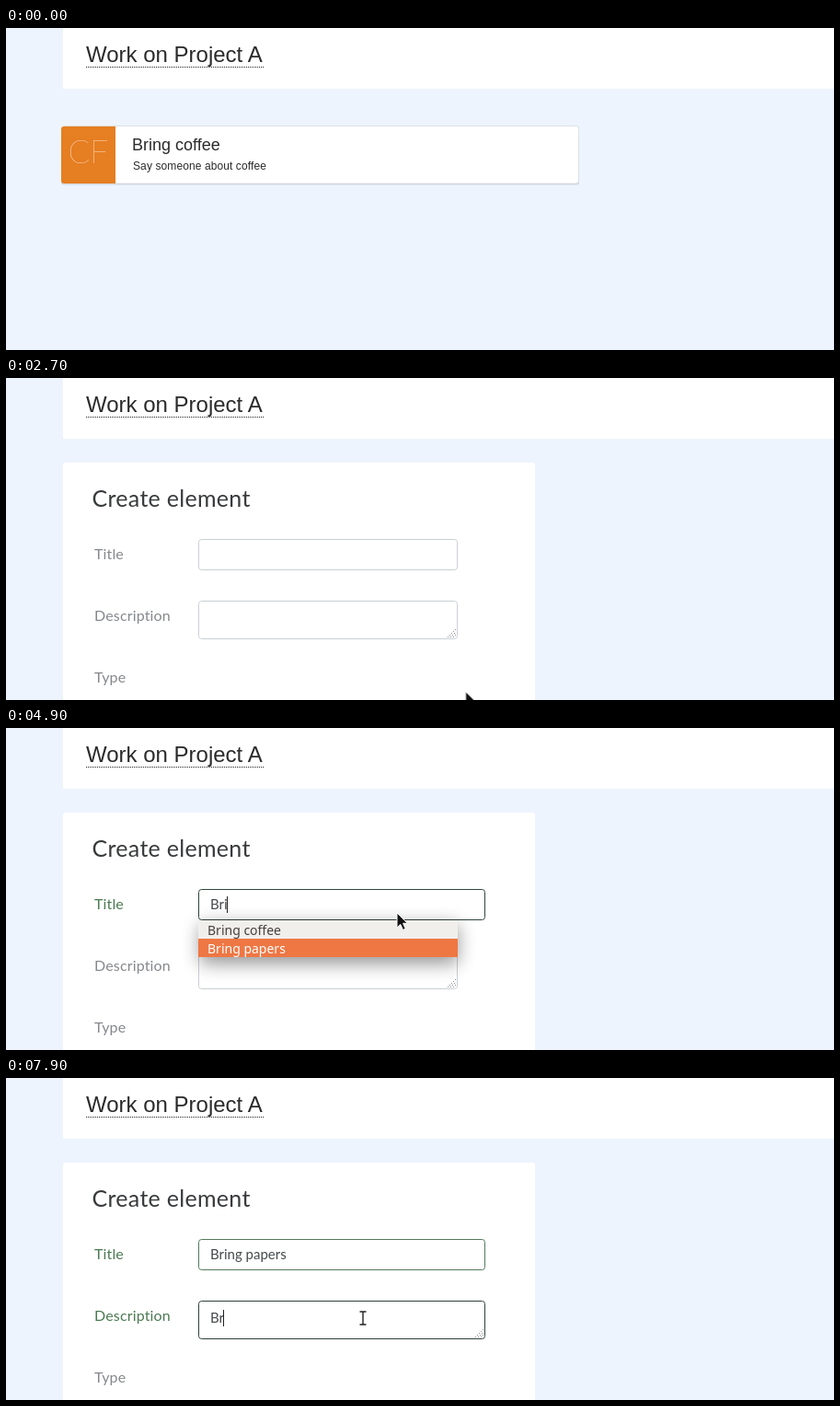
An HTML page for the animation above (8000 ms loop, 900x350 px).

```html
<!DOCTYPE html>
<html lang="en">
<head>
<meta charset="utf-8">
<title>Create element</title>
<style>
  html, body { margin: 0; width: 100%; height: 100%; overflow: hidden; background: #eef4fd; }
  svg { display: block; width: 900px; height: 350px; }

  .sans { font-family: "Liberation Sans", Arial, sans-serif; fill: #2b2b2b; }
  .lato { font-family: Lato, sans-serif; }
  .label { font-size: 16px; letter-spacing: .15px; fill: #85888c; }
  .value { font-size: 15px; fill: #454a4d; }
  .option { font: 14px "Noto Sans", sans-serif; fill: #45413e; }
  .field { fill: #fff; stroke: #c9d0d4; }
  .caret { fill: #222; }

  /* every track runs on the same 8 s clock */
  .list, .form, .label, .field, .grip, .pointer { animation: 8s linear infinite; }
  .step { animation: 8s step-end infinite; opacity: 0; }

  .list { animation-name: list; }
  .form { animation-name: form; }
  @keyframes list { 0%, 17% { opacity: 1; } 21.25%, 100% { opacity: 0; } }
  @keyframes form { 0%, 21.25% { opacity: 0; } 26.6%, 100% { opacity: 1; } }

  .label.t { animation-name: validTitle; }
  .label.d { animation-name: validDesc; }
  @keyframes validTitle { 0%, 49.5% { fill: #85888c; } 53%, 100% { fill: #4b7a52; } }
  @keyframes validDesc { 0%, 93% { fill: #85888c; } 96.5%, 100% { fill: #4b7a52; } }

  .field.t { animation-name: titleField; }
  .field.d { animation-name: descField; }
  @keyframes titleField {
    0%, 41% { stroke: #c9d0d4; width: 281px; }
    43% { stroke: #62647a; }
    46% { stroke: #34383c; }
    49% { width: 281px; }
    52.5% { width: 311px; }
    56%, 82% { stroke: #30463a; }
    86%, 100% { stroke: #527a5c; width: 311px; }
  }
  @keyframes descField {
    0%, 82.5% { stroke: #c9d0d4; width: 281px; }
    86% { stroke: #686b70; }
    90% { stroke: #34383c; }
    92.9% { width: 281px; }
    96.6%, 100% { stroke: #30403a; width: 311px; }
  }
  .grip { animation-name: grip; }
  @keyframes grip { 0%, 92.9% { transform: none; } 96.6%, 100% { transform: translateX(30px); } }

  .t1 { animation-name: t1; }
  .t2 { animation-name: t2; }
  .t3 { animation-name: t3; }
  .full { animation-name: full; }
  .d1 { animation-name: d1; }
  .d2 { animation-name: d2; }
  @keyframes t1 { 0% { opacity: 0; } 48.75% { opacity: 1; } 51.25%, 100% { opacity: 0; } }
  @keyframes t2 { 0% { opacity: 0; } 51.25% { opacity: 1; } 53.75%, 100% { opacity: 0; } }
  @keyframes t3 { 0% { opacity: 0; } 53.75% { opacity: 1; } 76.875%, 100% { opacity: 0; } }
  @keyframes full { 0% { opacity: 0; } 76.875%, 100% { opacity: 1; } }
  @keyframes d1 { 0% { opacity: 0; } 92.5% { opacity: 1; } 96.25%, 100% { opacity: 0; } }
  @keyframes d2 { 0% { opacity: 0; } 96.25%, 100% { opacity: 1; } }

  .caret.t { animation-name: titleCaret; }
  .caret.d { animation-name: descCaret; }
  @keyframes titleCaret {
    0% { opacity: 0; transform: none; }
    41.25% { opacity: 1; transform: none; }
    48.75% { opacity: 1; transform: translateX(10px); }
    51.25% { opacity: 1; transform: translateX(15px); }
    53.75% { opacity: 1; transform: translateX(18px); }
    65% { opacity: 0; transform: translateX(18px); }
    72.5% { opacity: 1; transform: translateX(18px); }
    76.875% { opacity: 1; transform: translateX(84px); }
    82.5%, 100% { opacity: 0; transform: none; }
  }
  @keyframes descCaret {
    0% { opacity: 0; transform: none; }
    82.5% { opacity: 1; transform: none; }
    92.5% { opacity: 1; transform: translateX(10px); }
    96.25%, 100% { opacity: 1; transform: translateX(14px); }
  }

  .popup { animation-name: popup; }
  .pick { animation-name: pick; }
  @keyframes popup { 0% { opacity: 0; } 52.5% { opacity: 1; } 76.875%, 100% { opacity: 0; } }
  @keyframes pick { 0% { opacity: 0; } 58.75%, 100% { opacity: 1; } }
  .shadow { filter: blur(10px); fill: #000; opacity: .42; }

  .pointer { animation-name: move; }
  .arrow { animation-name: arrow; }
  .beam { animation-name: beam; }
  @keyframes move {
    0%, 31% { transform: translate(520px, 380px); animation-timing-function: ease-in-out; }
    39.5%, 57.5% { transform: translate(427px, 202px); }
    58.75%, 62.5% { transform: translate(425px, 201px); animation-timing-function: ease-in-out; }
    70%, 77.5% { transform: translate(398px, 237px); animation-timing-function: ease-in-out; }
    81.5%, 100% { transform: translate(388px, 261px); }
  }
  @keyframes arrow {
    0% { opacity: 1; } 37.5% { opacity: 0; }
    57.5% { opacity: 1; } 79.5%, 100% { opacity: 0; }
  }
  @keyframes beam {
    0% { opacity: 0; } 37.5% { opacity: 1; }
    57.5% { opacity: 0; } 79.5%, 100% { opacity: 1; }
  }
</style>
</head>
<body>
<svg viewBox="0 0 900 350" xmlns="http://www.w3.org/2000/svg">
  <rect width="900" height="350" fill="#eef4fd"/>
  <rect x="62" width="838" height="66" fill="#fff"/>
  <text class="sans" x="87" y="37" font-size="24">Work on Project A</text>
  <path d="M87 42.5H280" stroke="#222" stroke-dasharray="1 1"/>

  <g class="list">
    <rect x="60" y="108" width="563" height="62.5" rx="3" fill="#cfd4db"/>
    <rect x="60.5" y="106.5" width="562" height="62.5" rx="3" fill="#fff" stroke="#dce0e6"/>
    <path d="M119 107H63q-3 0-3 3V166q0 3 3 3H119z" fill="#e67e22"/>
    <text class="lato" x="67.500" y="147" font-size="35" font-weight="200" fill="#fff">CF</text>
    <text class="sans" x="137" y="133" font-size="18">Bring coffee</text>
    <text class="sans" x="138" y="154" font-size="12" letter-spacing=".1">Say someone about coffee</text>
  </g>

  <g class="form">
    <rect x="62" y="92" width="513" height="270" rx="3" fill="#fff"/>
    <text class="lato" x="93.500" y="140" font-size="25" letter-spacing=".3" fill="#383a3c">Create element</text>
    <text class="lato label t" x="96" y="197">Title</text>
    <text class="lato label d" x="96" y="264">Description</text>
    <text class="lato label" x="96" y="331">Type</text>

    <rect class="field t" x="209.500" y="175.500" width="281" height="33" rx="3"/>
    <g class="lato value">
      <text class="step t1" x="222" y="197">B</text>
      <text class="step t2" x="222" y="197">Br</text>
      <text class="step t3" x="222" y="197">Bri</text>
      <text class="step full" x="222" y="197">Bring papers</text>
    </g>
    <rect class="caret step t" x="222" y="183" width="1" height="18"/>

    <rect class="field d" x="209.500" y="242.500" width="281" height="41" rx="3"/>
    <path class="grip" d="M480 282L489 273M483 282L489 276M486 282L489 279"
      fill="none" stroke="#8b8f92" stroke-dasharray="1.400 1.400"/>
    <g class="lato value">
      <text class="step d1" x="222" y="266">B</text>
      <text class="step d2" x="222" y="266">Br</text>
    </g>
    <rect class="caret step d" x="222" y="252" width="1" height="18"/>
  </g>

  <g class="step popup">
    <rect class="shadow" x="211" y="214" width="280" height="42"/>
    <rect x="209" y="209" width="282" height="40" fill="#f0efec"/>
    <text class="option" x="219" y="225">Bring coffee</text>
    <text class="option" x="219" y="245">Bring papers</text>
    <g class="step pick">
      <rect x="209" y="229" width="282" height="20" fill="#ee7744"/>
      <text class="option" x="219" y="245" style="fill:#fff">Bring papers</text>
    </g>
  </g>

  <g class="pointer">
    <path class="step arrow" d="M0 0V16L3.800 12.500 6.500 18.500 9.300 17.200 6.600 11.300H11.500z"
      fill="#111" stroke="#fff"/>
    <g class="step beam" fill="none">
      <path d="M-3.500-7H3.500M-3.500 7H3.500M0-7V7" stroke="#fff" stroke-width="3"/>
      <path d="M-3.500-7H3.500M-3.500 7H3.500M0-7V7" stroke="#222" stroke-width="1.400"/>
    </g>
  </g>
</svg>
</body>
</html>
```
